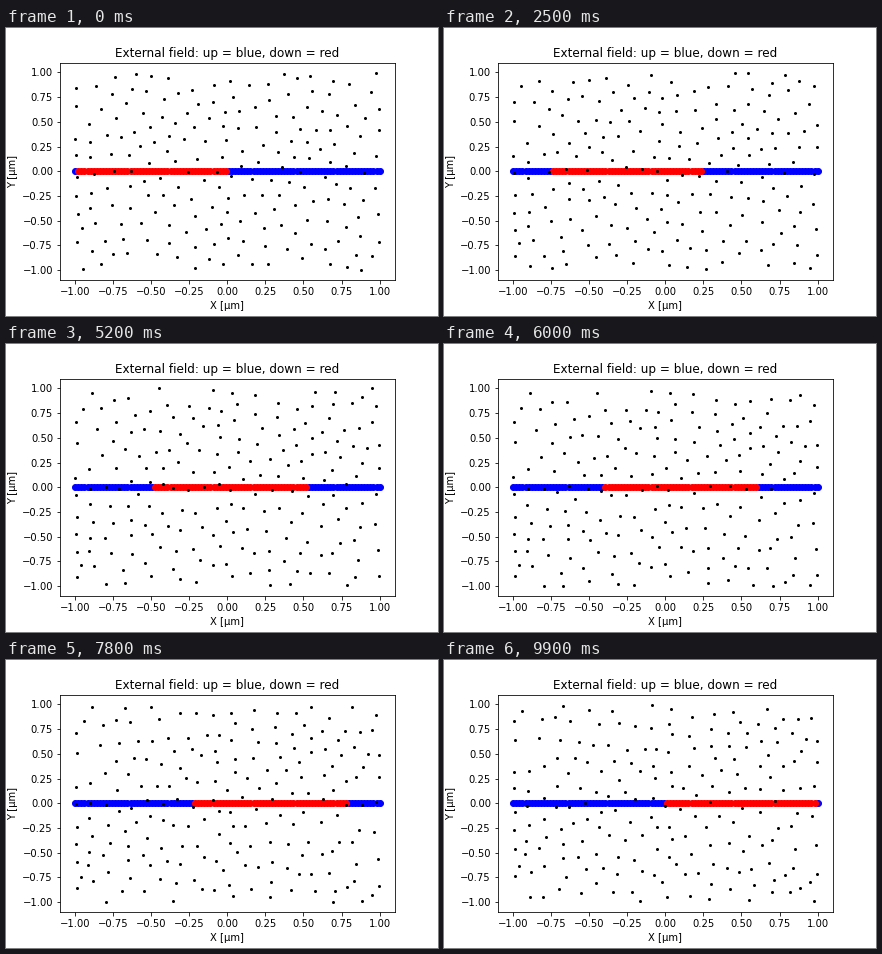
Recreate the animation shown at these times as a matplotlib script. Size 432x288 px, loop 10 s.

```python
import numpy as np
import matplotlib.pyplot as plt
from matplotlib.animation import FuncAnimation

FRAMES = 100
COUNT = 200
ASPECT = np.array([1.54, 1.0])  # screen width / height of one data unit


def wrap(y):
    return (y + 1) % 2 - 1


def seed_tracers():
    """Best-candidate sampling, periodic in y."""
    rng = np.random.default_rng(11)
    pts = rng.uniform(-1, 1, (1, 2))
    while len(pts) < COUNT:
        cand = rng.uniform(-1, 1, (400, 2))
        gap = cand[:, None] - pts[None]
        gap[..., 1] = wrap(gap[..., 1])
        nearest = np.hypot(*np.moveaxis(gap * ASPECT, -1, 0)).min(axis=1)
        pts = np.vstack([pts, cand[nearest.argmax()]])
    return pts


def center(t):
    return -.5 + t / FRAMES


def flow(p, t):
    """Rolls that travel along with the red domain."""
    x, y = p.T
    u = np.pi * (x - center(t))
    vy = (np.sin(u) - np.sin(3 * u) / 9) * (1 + .15 * np.cos(np.pi * y))
    vx = -.15 * np.sin(np.pi * y) * (np.cos(u) - np.cos(3 * u) / 27)
    vx *= np.clip(4 * (1 - np.abs(x)), 0, 1)  # closed side walls
    return .0068 * np.column_stack([vx, vy])


def trace():
    path = [seed_tracers()]
    for t in range(FRAMES - 1):
        p = path[-1]
        p = p + flow(p + flow(p, t) / 2, t + .5)
        p[:, 1] = wrap(p[:, 1])
        path.append(p)
    return path


path = trace()
line_x = np.linspace(-1, 1, 100)

fig, ax = plt.subplots(figsize=(6, 4), dpi=72)
fig.subplots_adjust(left=.125, right=.9, bottom=.125, top=.88)
ax.set(xlim=(-1.1, 1.1), ylim=(-1.1, 1.1), xlabel="X [µm]", ylabel="Y [µm]",
       title="External field: up = blue, down = red")
ticks = np.linspace(-1, 1, 9)
ax.set_xticks(ticks)
ax.set_yticks(ticks)

up, = ax.plot([], [], "bo")
down, = ax.plot([], [], "ro")
tracers, = ax.plot([], [], "k.", markersize=4)


def draw(i):
    red = np.abs(line_x - center(i)) < .5 - 1e-9
    for dots, mask in ((up, ~red), (down, red)):
        dots.set_data(line_x[mask], np.zeros(mask.sum()))
    tracers.set_data(*path[i].T)
    return up, down, tracers


anim = FuncAnimation(fig, draw, frames=FRAMES, init_func=lambda: draw(0),
                     interval=100, repeat=True, repeat_delay=0)
plt.show()
```
